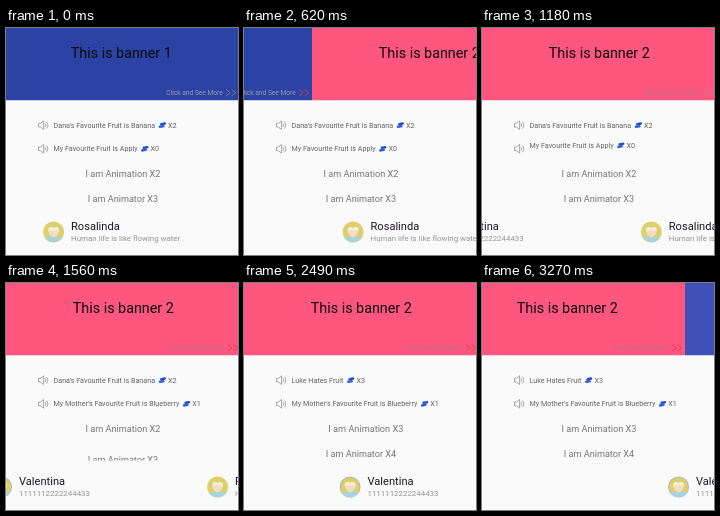
Recreate the animation shown at these times as an HTML page with a canvas. Size 232x227 px, loop 3.35 s.

```html
<!DOCTYPE html>
<html lang="en">
<head>
<meta charset="utf-8">
<title>Banner and marquee views</title>
<style>
html, body { margin: 0; width: 100%; height: 100%; overflow: hidden; background: #fafafa; }
canvas { display: block; width: 232px; height: 227px; }
</style>
</head>
<body>
<canvas id="stage"></canvas>
<script>
const W = 232, H = 227, LOOP = 3350, PAGE = 235, BANNER_H = 72.5;
const canvas = document.getElementById('stage');
const ctx = canvas.getContext('2d');
const dpr = window.devicePixelRatio || 1;
canvas.width = W * dpr;
canvas.height = H * dpr;

// Step start times: runs of [first, last, count]
const steps = [0];
[[70, 240, 3], [390, 860, 7], [940, 1410, 7], [1490, 2010, 8],
 [2100, 2570, 7], [2670, 3120, 7], [3200, 3270, 2]].forEach(([a, b, n]) => {
  for (let i = 0; i < n; i++) steps.push(a + (b - a) * i / (n - 1));
});

const clamp = v => Math.max(0, Math.min(1, v));
const ease = u => (1 - Math.cos(Math.PI * clamp(u))) / 2;
const span = (n, a, b) => ease((n - a) / (b - a));

function stepAt(ms) {
  let n = 0;
  while (n + 1 < steps.length && steps[n + 1] <= ms + 5) n++;
  return n;
}

function track(keys, n) {
  let i = 1;
  while (i < keys.length - 1 && keys[i][0] < n) i++;
  const [a, x] = keys[i - 1], [b, y] = keys[i];
  return x + (y - x) * (n - a) / (b - a);
}

function text(s, x, y, size, color) {
  ctx.font = size + 'px Roboto, sans-serif';
  ctx.fillStyle = color;
  ctx.fillText(s, x, y);
  return ctx.measureText(s).width;
}

function clipTo(x, y, w, h, draw) {
  ctx.save();
  ctx.beginPath();
  ctx.rect(x, y, w, h);
  ctx.clip();
  draw();
  ctx.restore();
}

function disc(x, y, r, fill) {
  ctx.beginPath();
  ctx.arc(x, y, r, 0, Math.PI * 2);
  ctx.fillStyle = fill;
  ctx.fill();
}

function chevron(x, color) {
  ctx.beginPath();
  ctx.moveTo(x, 61.5);
  ctx.lineTo(x + 4.2, 64.7);
  ctx.lineTo(x, 67.9);
  ctx.strokeStyle = color;
  ctx.lineWidth = 0.9;
  ctx.stroke();
}

const blueHint = { label: '#989aa4', lit: '#c8435c', dim: '#8b8272' };
const pinkHint = { label: '#b87486', lit: '#d83a56', dim: '#c47c82' };

function banner(x, bg, title, hint, n) {
  ctx.fillStyle = bg;
  ctx.fillRect(x, 0, PAGE, BANNER_H);
  text(title, x + 66.8, 30, 14.33, '#0a0a0a');
  text('Click and See More', x + 162.3, 67.2, 6.62, hint.label);
  const color = Math.floor(n / 4) % 3 ? hint.lit : hint.dim;
  chevron(x + 222, color);
  chevron(x + 227.5, color);
}

function banners(n) {
  const u = 0.057 + n * 0.0831;
  const first = Math.round(PAGE * ease(u));
  const second = Math.round(PAGE * ease(u - 3.223));
  clipTo(0, 0, W, BANNER_H, () => {
    if (first < PAGE) banner(-first, '#2b43a4', 'This is banner 1', blueHint, n);
    banner(PAGE - first - second, '#ff5680', 'This is banner 2', pinkHint, n);
    if (second > 0) banner(PAGE - second, '#3f51b8', 'This is banner 3', blueHint, n);
  });
}

function speaker(y) {
  ctx.strokeStyle = '#8c8c8c';
  ctx.lineWidth = 0.75;
  ctx.lineJoin = 'round';
  ctx.beginPath();
  ctx.moveTo(32.5, y - 1.8);
  ctx.lineTo(34.3, y - 1.8);
  ctx.lineTo(37.6, y - 4.3);
  ctx.lineTo(37.6, y + 4.3);
  ctx.lineTo(34.3, y + 1.8);
  ctx.lineTo(32.5, y + 1.8);
  ctx.closePath();
  ctx.stroke();
  for (const r of [2.3, 4.4]) {
    ctx.beginPath();
    ctx.arc(37.4, y, r, -0.9, 0.9);
    ctx.stroke();
  }
}

// Slanted cluster of two rows
function berry(x, y) {
  for (let i = -1; i <= 1; i++) {
    disc(x + i * 1.6 + 0.7, y - 1.3 - i * 0.3, 1.3, '#1f4bd0');
    disc(x + i * 1.6 - 0.7, y + 1.3 - i * 0.3, 1.3, '#2a5cd8');
  }
}

function notice(y, line, count) {
  const end = 47.5 + text(line, 47.5, y + 2.6, 7.2, '#626262');
  berry(end + 7.2, y);
  text(count, end + 13, y + 2.6, 7.2, '#626262');
}

function noticeRow(y, from, to, p) {
  speaker(y);
  clipTo(45, y - 7, W, 14, () => {
    if (p < 1) notice(y - 14 * p, ...from);
    if (p > 0) notice(y + 14 * (1 - p), ...to);
  });
}

function avatar(x, y, ringed) {
  disc(x, y, 10.5, ringed ? '#a9bfc0' : '#dcd06a');
  disc(x, y, 9.4, '#dcd06a');
  ctx.beginPath();
  ctx.arc(x, y, 10.3, 0.5, Math.PI - 0.5);
  ctx.fillStyle = '#a8d3de';
  ctx.fill();
  disc(x - 2.4, y - 2, 3, '#f6efd8');
  disc(x + 2.4, y - 2, 3, '#f6efd8');
  ctx.beginPath();
  ctx.moveTo(x - 5.3, y - 1.5);
  ctx.lineTo(x + 5.3, y - 1.5);
  ctx.quadraticCurveTo(x + 4.6, y + 5, x, y + 5.4);
  ctx.quadraticCurveTo(x - 4.6, y + 5, x - 5.3, y - 1.5);
  ctx.fillStyle = '#f3dcc4';
  ctx.fill();
}

function person(x, name, note, ringed) {
  if (x > W + 30 || x < -120) return;
  avatar(x - 17.4, 204, ringed);
  text(name, x, 201.7, 11.1, '#1c1820');
  text(note, x, 213, 7.9, '#949494');
}

function draw(ms) {
  const n = stepAt(ms);
  ctx.setTransform(dpr, 0, 0, dpr, 0, 0);
  ctx.fillStyle = '#fafafa';
  ctx.fillRect(0, 0, W, H);

  banners(n);

  noticeRow(97.2, ["Dana's Favourite Fruit is Banana", 'X2'], ['Luke Hates Fruit', 'X3'], span(n, 20, 25));
  noticeRow(120.8, ['My Favourite Fruit is Apply', 'X0'],
    ["My Mother's Favourite Fruit is Blueberry", 'X1'], span(n, 12, 18));

  const slide = PAGE * span(n, 20.1, 32.1);
  text('I am Animation X2', 79.5 - slide, 149.2, 9.17, '#757575');
  text('I am Animation X3', 79.5 + PAGE - slide, 149.2, 9.17, '#757575');

  const drop = 17 * span(n, 14.5, 26);
  clipTo(0, 164.5, W, 13, () => {
    text('I am Animator X3', 81.7, 174.4 + drop, 9.15, '#757575');
    text('I am Animator X4', 81.7, 157.4 + drop, 9.15, '#757575');
  });

  const x = track([[0, 65], [4, 100], [10, 153], [19, 229], [26, 298], [36, 381], [41, 430]], n);
  person(x, 'Rosalinda', 'Human life is like flowing water', false);
  person(x - 216, 'Valentina', '1111112222244433', true);
}

const start = performance.now();
function loop() {
  draw((performance.now() - start) % LOOP);
  requestAnimationFrame(loop);
}
loop();
</script>
</body>
</html>
```
